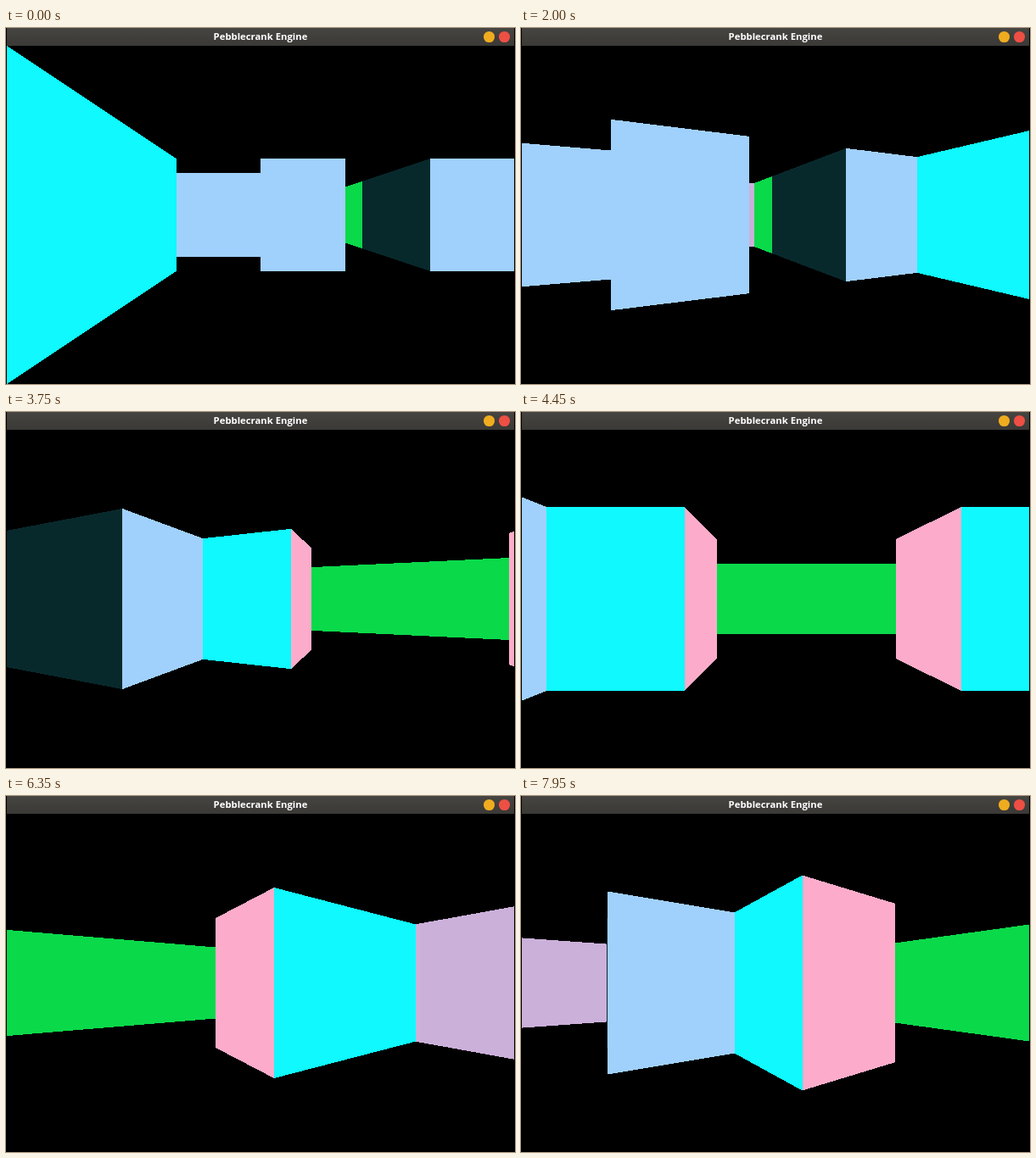
Write an HTML page with a canvas that moves like this. It is 600 px wide and 420 px high and loops after 8 s.

```html
<!DOCTYPE html>
<html lang="en">
<head>
<meta charset="utf-8">
<title>Pebblecrank Engine</title>
<style>
  html, body { margin: 0; width: 100%; height: 100%; overflow: hidden; background: #000; }
  canvas { position: absolute; left: 0; top: 0; display: block; }
  .bar {
    position: absolute; left: 1px; top: 0; width: 598px; height: 21px;
    background: linear-gradient(#464542, #3a3936);
    color: #fff; font: 700 11.3px/20px "Open Sans", "Noto Sans", sans-serif;
    text-align: center; white-space: nowrap;
  }
  .dot { position: absolute; top: 4px; width: 12.6px; height: 12.6px; border-radius: 50%; }
</style>
</head>
<body>
<canvas id="view" width="600" height="420"></canvas>
<div class="bar">Pebblecrank Engine
  <i class="dot" style="left:562px;background:#efac1f"></i>
  <i class="dot" style="left:580px;background:#ee4f44"></i>
</div>
<script>
const ctx = document.getElementById('view').getContext('2d');

const LEFT = 1, RIGHT = 599, TOP = 21, BOTTOM = 420;
const MID_X = 300.5, MID_Y = 220.5, FOCAL = 299.5, WALL = 399;
const LOOP = 8000, TURN = Math.PI / 16, STEP = 0.5;

const CYAN = '#0ff9fe', BLUE = '#a0d0fc', GREEN = '#0ad94a',
      TEAL = '#08292c', PINK = '#fcacca', LILAC = '#cbb0da';

// Walls lie on a line x = at or y = at, between two ends on the other axis
const walls = [
  ['x', -1, -2, 3, CYAN],
  ['y', 4, -3, 0, BLUE],
  ['y', 3, 0, 1, BLUE],
  ['y', 6, 0, 2, LILAC],
  ['x', 2, 5, 6, GREEN],
  ['x', 2, 3, 5, TEAL],
  ['y', 3, 2, 3, BLUE],
  ['x', 3, 2, 3, CYAN],
  ['y', 2, 3, 4, PINK],
  ['x', 6, -2, 4, GREEN],
  ['y', 0, 3, 4, PINK],
  ['x', 3, -2, 0, CYAN],
  ['y', -2, -1, 3, LILAC]
];

// Key presses: R and L turn, F walks
const keys = [
  ['R', 950, 1250], ['F', 1650, 2000], ['R', 2400], ['F', 2850],
  ['R', 3300, 3500, 3700, 3900, 4100], ['F', 4450],
  ['R', 4750, 4950, 5150, 5350, 5550], ['L', 5950, 6150],
  ['F', 6350, 6550],
  ['L', 6850, 7050, 7200, 7350, 7450, 7600, 7750, 7850]
];

function pose(t) {
  let x = 0, y = 0, turns = 0;
  for (const [key, ...times] of keys) {
    for (const at of times) {
      if (at > t) return { x, y, angle: turns * TURN };
      if (key === 'R') turns++;
      else if (key === 'L') turns--;
      else {
        x += Math.sin(turns * TURN) * STEP;
        y += Math.cos(turns * TURN) * STEP;
      }
    }
  }
  return { x, y, angle: turns * TURN };
}

function cast(cam, dx, dy) {
  let depth = Infinity, color = null;
  for (const [axis, at, from, to, tint] of walls) {
    const flat = axis === 'x';
    const d = flat ? (at - cam.x) / dx : (at - cam.y) / dy;
    if (!(d > 0.01 && d < depth)) continue;
    const along = flat ? cam.y + dy * d : cam.x + dx * d;
    if (along >= from && along <= to) {
      depth = d;
      color = tint;
    }
  }
  return { depth, color };
}

function draw(t) {
  const cam = pose(t);
  const s = Math.sin(cam.angle), c = Math.cos(cam.angle);
  ctx.fillStyle = '#000';
  ctx.fillRect(0, 0, 600, BOTTOM);
  for (let i = LEFT; i < RIGHT; i++) {
    const k = (i + 0.5 - MID_X) / FOCAL;
    const hit = cast(cam, s + c * k, c - s * k);
    if (!hit.color) continue;
    const half = WALL / hit.depth / 2;
    const top = Math.max(TOP, Math.round(MID_Y - half));
    const end = Math.min(BOTTOM, Math.round(MID_Y + half));
    ctx.fillStyle = hit.color;
    ctx.fillRect(i, top, 1, end - top);
  }
}

const start = performance.now();
function tick() {
  draw((performance.now() - start) % LOOP);
  requestAnimationFrame(tick);
}
tick();
</script>
</body>
</html>
```
